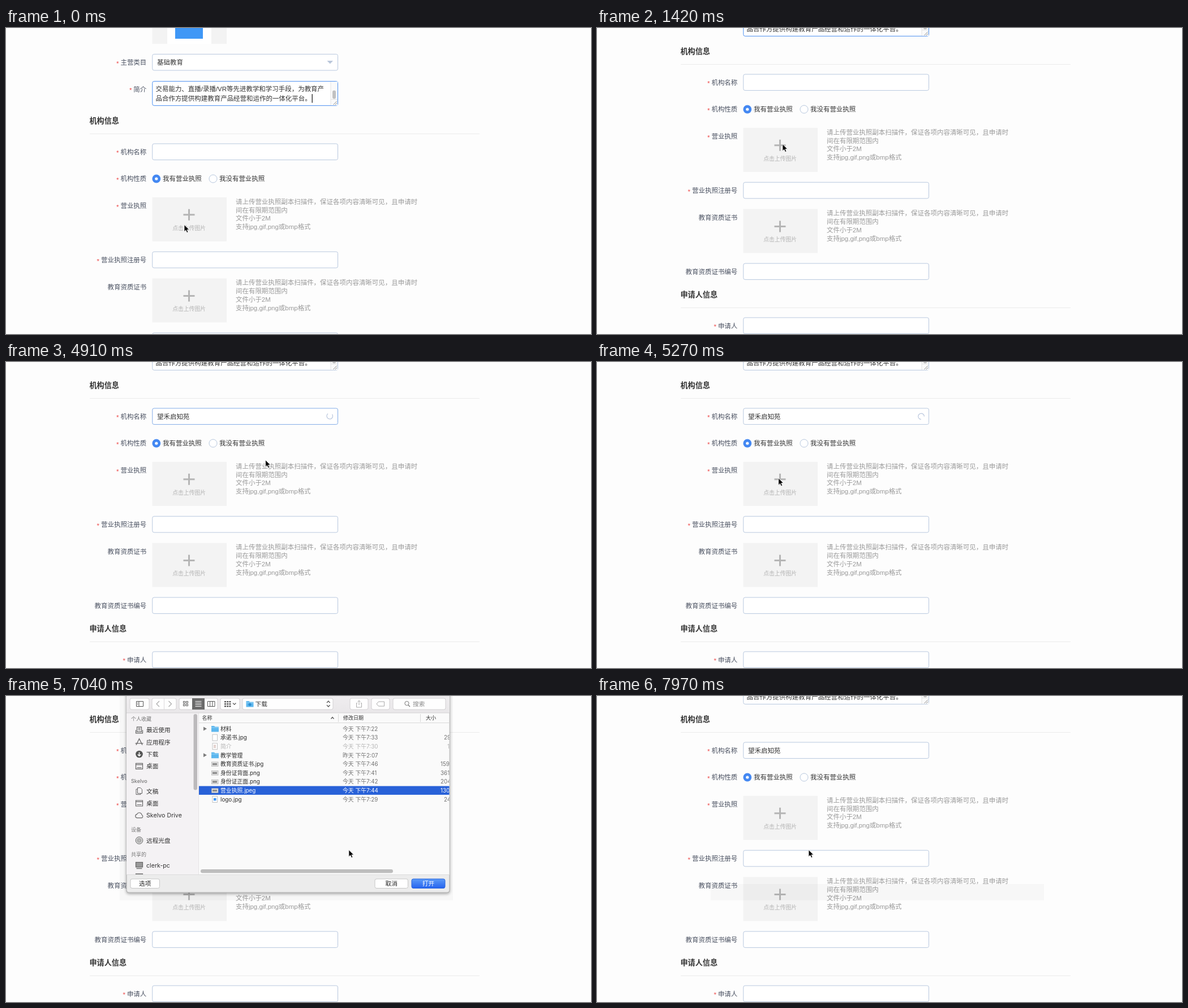
An HTML page for the animation above (8000 ms loop, 1034 by 542 pixels).

```html
<!DOCTYPE html>
<html lang="zh-CN">
<head>
<meta charset="utf-8">
<style>
html, body { margin: 0; width: 100%; height: 100%; overflow: hidden; background: #fdfdfd; }
svg { display: block; width: 1034px; height: 542px; font-family: "Liberation Sans", "Noto Sans CJK SC", "Noto Sans CJK", sans-serif; }
#sheet, #ime { font-family: Inter, "Noto Sans CJK SC", "Noto Sans CJK", sans-serif; }
text { white-space: pre; }
</style>
</head>
<body>
<svg id="stage" viewBox="0 0 1034 542">
  <defs>
    <clipPath id="areaClip"><rect x="259" y="95" width="315" height="42"/></clipPath>
    <clipPath id="listClip"><rect x="341" y="30" width="442.5" height="286"/></clipPath>
    <clipPath id="sideClip"><rect x="213" y="30" width="128" height="286"/></clipPath>
    <linearGradient id="bar" x2="0" y2="1"><stop stop-color="#f3f1f3"/><stop offset="1" stop-color="#e9e7e9"/></linearGradient>
    <linearGradient id="blue" x2="0" y2="1"><stop stop-color="#5b9af8"/><stop offset="1" stop-color="#2563ee"/></linearGradient>
    <filter id="soft" x="-10%" y="-20%" width="120%" height="150%"><feDropShadow dx="0" dy="2" stdDeviation="2.5" flood-opacity=".35"/></filter>
  </defs>
  <g id="page"></g>
  <rect id="shade" x="201" width="589" fill="#000" opacity=".022"/>
  <g id="sheet"></g>
  <g id="ime"></g>
  <path id="arrow" d="M0 0V12.2L2.8 9.6L4.8 14L6.9 13.1L5 8.8H8.8Z" fill="#000" stroke="#fff" stroke-width=".8"/>
  <path id="beam" d="M-3 -7Q0 -7 0 -5Q0 -7 3 -7M0 -5V5M-3 7Q0 7 0 5Q0 7 3 7M-1.5 2H1.5" fill="none" stroke="#222" stroke-width="1.2"/>
</svg>
<script>
const $ = id => document.getElementById(id);
const BASE = 11.48, LINE = '#b8c8de', FOCUS = '#4b8ff0', NAME = '望禾启知苑';

// Text is placed by the vertical middle of its characters.
const text = (x, y, s, size = BASE, fill = '#333', more = '') =>
  `<text x="${x}" y="${y + size * .38}" font-size="${size}" fill="${fill}" ${more}>${s}</text>`;
const rect = (x, y, w, h, fill, more = '') =>
  `<rect x="${x}" y="${y}" width="${w}" height="${h}" fill="${fill}" ${more}/>`;
const path = (d, stroke, w = 1, more = '') =>
  `<path d="${d}" fill="none" stroke="${stroke}" stroke-width="${w}" ${more}/>`;
const solid = (d, fill) => `<path d="${d}" fill="${fill}"/>`;
const circle = (x, y, r, fill, more = '') => `<circle cx="${x}" cy="${y}" r="${r}" fill="${fill}" ${more}/>`;

const label = (y, s, must = true) =>
  text(248.3, y, s, BASE, '#495060', 'text-anchor="end"') +
  (must ? text(195 - (s.length - 4) * BASE, y + 1.5, '*', BASE, '#ed3f3f') : '');
const field = (y, h = 28.6, id = '') =>
  rect(258.8, y, 327.7, h, '#fff', `rx="3" stroke="${LINE}" id="${id}"`);
const heading = (y, s) =>
  text(147.5, y, s, 13.12, '#333', 'font-weight="600"') +
  path(`M148 ${y + 23.5}H837`, '#ececec');
const hints = ['请上传营业执照副本扫描件，保证各项内容清晰可见，且申请时', '间在有限期范围内', '文件小于2M', '支持jpg,gif,png或bmp格式'];
const upload = y =>
  rect(258.5, y, 131.5, 78, '#f3f3f3') +
  path(`M313.5 ${y + 31}H333.5M323.5 ${y + 21}V${y + 41}`, '#b5b5b5', 3) +
  text(323.7, y + 54, '点击上传图片', 9.84, '#b3b3b3', 'text-anchor="middle"') +
  hints.map((s, i) => text(406, y + 7.6 + i * 14.75, s, BASE, '#999')).join('');

function buildPage() {
  return rect(258.5, -50, 131.5, 78, '#f3f3f3') + rect(285, -50, 78, 78, '#fff') + rect(299, -30, 49, 49, '#3f97f6') +
    label(61, '主营类目') + field(46.4) + text(267, 61, '基础教育') + solid('M567.5 58H578L572.8 63.5Z', '#b9c6da') +
    label(108.5, '简介') + field(94.4, 43, 'area') +
    `<g clip-path="url(#areaClip)">${text(264.5, 107.2, '交易能力、直播/录播/VR等先进教学和学习手段，为教育产')}${text(264.5, 124.8, '品合作方提供构建教育产品经营和运作的一体化平台。')}</g>` +
    rect(574, 95, 12, 42, '#fafafa') + path('M574 95V137M574 126.5H586', '#e3e3e3') +
    rect(577, 110.5, 6, 15, '#c1c1c1', 'rx="3"') + path('M578.5 136L585 129.5M582 136L585 133', '#8a8a8a') +
    rect(540.6, 117, 1.2, 15.5, '#111', 'id="areaCaret"') +
    heading(164, '机构信息') +
    label(219.2, '机构名称') + field(205, 28.6, 'org') + text(267, 219.2, '', BASE, '#333', 'id="typed"') +
    path('M267 226.5H276', '#333', 1, 'id="under"') + rect(267, 211, 1, 16, '#111', 'id="caret"') +
    path('M569 214.5A5.3 5.3 0 1 0 576.5 215.5', '#b9c6dd', 1.2, 'id="spin"') +
    label(267, '机构性质') + circle(265.8, 267, 7.4, '#4488f2') + circle(265.8, 267, 2.6, '#fff') +
    text(277, 267, '我有营业执照') + circle(366, 267, 7, '#fff', `stroke="${LINE}"`) + text(377, 267, '我没有营业执照') +
    label(315, '营业执照') + upload(299.8) +
    label(411, '营业执照注册号') + field(396.3) +
    label(458.5, '教育资质证书', false) + upload(443.5) +
    label(554.5, '教育资质证书编号', false) + field(540) +
    heading(595, '申请人信息') + label(650.3, '申请人') + field(636);
}

const box = (x, w, y = 4, h = 20, fill = '#fefefe') => rect(x, y, w, h, fill, 'rx="3" stroke="#d2d0d2"');
const folder = (x, y) => solid(`M${x} ${y - 5}h5l1.5 1.5h6.5v9h-13z`, '#5db7ee') + path(`M${x} ${y - 2}h13`, '#9ad5f6');

function toolbar() {
  const g = '#555', pale = '#a9a9a9';
  let dots = '';
  for (let i = 0; i < 4; i++) dots += rect(313.5 + (i % 2) * 5, 9.5 + (i >> 1) * 5, 3, 3, 'none', `stroke="${g}" stroke-width=".9"`);
  for (let i = 0; i < 9; i++) dots += rect(386 + (i % 3) * 4.2, 9 + Math.floor(i / 3) * 4, 3, 2.4, g);
  return rect(213, -20, 571, 50, 'url(#bar)') + path('M213 30H784', '#cfcdcf') +
    box(219, 34) + path('M230.5 9.5H242.5V18.5H230.5ZM235 9.5V18.5M232 12H233.5M232 14.5H233.5', g) +
    box(258, 43) + path('M279.5 4V24', '#dcdadc') + path('M271 9L266 14L271 19M287.5 9L292.5 14L287.5 19', '#aaa', 1.2) +
    box(306, 68) + rect(329, 4, 22, 20, '#6a6a6a') + path('M334.5 9.5H345.5M334.5 12.5H345.5M334.5 15.5H345.5M334.5 18.5H345.5', '#fff') +
    path('M356.5 9.5H369V18.5H356.5ZM360.6 9.5V18.5M364.8 9.5V18.5', g) +
    box(379, 34) + dots + path('M401 12.5L403.7 15.2L406.4 12.5', g, 1.2) +
    box(418, 160) + folder(424.5, 14) + circle(431, 15, 2.6, '#2b8dd0') + text(440.5, 14.2, '下载', 10.66) +
    path('M567 12L569.8 9L572.6 12M567 16L569.8 19L572.6 16', g, 1.2) +
    box(608, 32) + path('M621 12.5H619.5V20H628.5V12.5H627M624 16V8M621.5 10.3L624 8L626.5 10.3', pale) +
    box(646, 32) + path('M655 14L658.5 10H668.5V18H658.5Z', pale) +
    box(684, 93) + circle(708.5, 13, 3.6, 'none', 'stroke="#777"') + path('M711 16L714 19', '#777', 1.2) + text(719, 14.2, '搜索', 10.66, '#8b8b8b');
}

function sidebar() {
  const g = '#666';
  const head = (y, s) => text(221, y, s, 9, '#777', 'font-weight="500"');
  const item = (y, s, icon) => text(248, y, s, 10.66, '#333') + `<g transform="translate(235.5 ${y})">${icon}</g>`;
  const desk = path('M-6 -5H6V5H-6ZM-6 -2.8H6M-4 2.5H4', g, 1.2);
  const screen = rect(-6, -5.5, 12, 8.5, '#999', `stroke="${g}" stroke-width="1.2"`) + path('M-5 5.5H5', g, 1.4);
  return rect(213, 30.5, 128, 286, '#f4f2f4') + `<g clip-path="url(#sideClip)">` +
    head(41, '个人收藏') +
    item(60.3, '最近使用', path('M-4 -5.5H4V3H-4ZM-6 0V5.5H6V0M-2 -3H2M-2 -.5H2', g, 1.2)) +
    item(81.8, '应用程序', path('M-5.5 5L0 -6L5.5 5M-7 2H7', g, 1.3)) +
    item(103, '下载', circle(0, 0, 6.3, '#555') + path('M0 -3.5V3M-2.8 .5L0 3.3L2.8 .5', '#fff', 1.5)) +
    item(124.4, '桌面', desk) +
    head(150.3, 'Skelvo') +
    item(168.5, '文稿', path('M-3 -6H2L5 -3V4H-3ZM-3 -3.5H-5.5V6H2.5V4', g)) +
    item(190, '桌面', desk) +
    item(211.4, 'Skelvo Drive', path('M-4 4.5H4.5A3 3 0 0 0 4.5 -1A4.5 4.5 0 0 0 -4 -2A3.3 3.3 0 0 0 -4 4.5Z', g, 1.1)) +
    head(237, '设备') +
    item(255.8, '远程光盘', circle(0, 0, 6.3, '#ddd', `stroke="${g}"`) + circle(0, 0, 3.6, 'none', `stroke="${g}" stroke-width=".7"`) + circle(0, 0, 1.6, '#fff', `stroke="${g}"`)) +
    head(281, '共享的') + item(300, 'clerk-pc', screen) + item(320.5, '', screen) +
    '</g>' + rect(331.5, 32, 6.5, 134.5, '#bcbabc', 'rx="3.2"') + path('M341 30V316', '#d8d6d8');
}

const files = [
  ['材料', '今天 下午7:22', '', 'dir'], ['承诺书.jpg', '今天 下午7:33', '29', 'doc'],
  ['简介', '今天 下午7:30', '1', 'off'], ['教学管理', '昨天 下午2:07', '', 'dir'],
  ['教育资质证书.jpg', '今天 下午7:46', '159', 'pic'], ['身份证背面.png', '今天 下午7:41', '361', 'pic'],
  ['身份证正面.png', '今天 下午7:42', '204', 'pic'], ['营业执照.jpeg', '今天 下午7:44', '130', 'pic'],
  ['logo.jpg', '今天 下午7:29', '24', 'logo']];

function fileIcon(kind, y) {
  if (kind == 'dir') return solid(`M349 ${y - 3.5}L355 ${y}L349 ${y + 3.5}Z`, '#7d7d7d') + folder(363, y);
  if (kind == 'pic') return rect(363.5, y - 3.5, 11.5, 7.5, '#e4e4e4', 'stroke="#aaa" stroke-width=".7"') + rect(365, y - 1.5, 8, 3.5, '#8d8d8d');
  const page = rect(365, y - 5.5, 8.5, 11, '#fff', 'stroke="#b5b5b5" stroke-width=".8"');
  if (kind == 'logo') return page + rect(367, y - 2.2, 4.5, 4.5, '#3f97f6');
  return page + (kind == 'off' ? path(`M367 ${y - 2}h4M367 ${y}h4M367 ${y + 2}h4`, '#c9a9a0') : '');
}

function fileList() {
  const rows = files.map(([name, date, size, kind], i) => {
    const y = 58 + i * 15.62, off = kind == 'off', pick = i == 7;
    const soft = off ? '#b5b5b5' : '#727272';
    return (pick ? rect(341, y - 7.8, 443, 15.4, '#2861d8', 'id="pick"') : '') + fileIcon(kind, y) +
      `<g ${pick ? 'id="pickText"' : ''}>` + text(379, y, name, 9.84, off ? '#b5b5b5' : '#2b2b2b') +
      text(595, y, date, 9.84, soft) + text(768 + (3 - size.length) * 6, y, size, 9.84, soft) + '</g>';
  });
  return `<g clip-path="url(#listClip)">` + rect(341, 30.5, 443, 286, '#fafafa') +
    text(346.5, 39, '名称', 9) + text(596, 39, '修改日期', 9) + text(742, 39, '大小', 9) +
    path('M574.5 40.5L577 37.5L579.5 40.5', '#555', 1.2) + path('M587.5 32V46M732.5 32V46M341 47.5H784', '#d9d9d9') +
    rows.join('') + rect(344, 307, 340, 6.6, '#bdbdbd', 'rx="3.3"') + '</g>';
}

function buildSheet() {
  const button = (x, w, s, id = '') =>
    rect(x, 324, w, 16.5, '#fff', `rx="3" stroke="#c6c6c6" id="${id}"`) +
    text(x + w / 2, 332.3, s, 10.66, '#222', `text-anchor="middle" id="${id}Text"`);
  return `<path d="M213 -20H784V344Q784 348 780 348H217Q213 348 213 344Z" fill="#ececec" stroke="#a9a9a9" filter="url(#soft)"/>` +
    toolbar() + sidebar() + fileList() + path('M213 316.5H784', '#dcdcdc') +
    button(220, 51.5, '选项', 'opt') + button(652, 58.5, '取消', 'no') + button(717, 59, '打开', 'ok');
}

function buildIme() {
  return rect(253, 109, 324, 23.5, '#f5f5f5', 'rx="4" stroke="#c9c9c9" filter="url(#soft)"') +
    rect(256, 111.5, 27, 17.5, '#cfe5fa', 'rx="3" stroke="#a9cdf0" stroke-width=".8"') +
    [...'为问位微未文味维胃'].map((c, i) => text(258 + i * 32, 120.3, i + 1, 9, '#777') + text(266 + i * 32, 120.3, c, 13.1, '#111')).join('') +
    path('M560.5 118L564.8 122L569 118', '#999', 1.1);
}

$('page').innerHTML = buildPage();
$('sheet').innerHTML = buildSheet();
$('ime').innerHTML = buildIme();

const clamp = v => Math.max(0, Math.min(1, v));
const part = (t, a, b) => clamp((t - a) / (b - a));
const within = (t, a, b) => t >= a && t < b;
const show = (id, on) => $(id).style.display = on ? '' : 'none';
const mix = (a, b, k) => {
  const c = i => Math.round(parseInt(a.substr(i, 2), 16) * (1 - k) + parseInt(b.substr(i, 2), 16) * k);
  return `rgb(${c(1)},${c(3)},${c(5)})`;
};
const smooth = k => k * k * (3 - 2 * k);

// Pointer stops: time, x, y
const stops = [[0, 315, 348.5], [1060, 315, 348.5], [1300, 326, 235], [1420, 328, 206], [1590, 315, 138],
  [1830, 306, 100], [2000, 305.5, 95], [3840, 305.5, 95], [4250, 430, 190], [4610, 459, 173.5],
  [4910, 459, 173.5], [5220, 325, 208], [5400, 310, 200], [5660, 275, 145], [5720, 275, 140], [6160, 415.5, 165],
  [6640, 415.5, 165], [7000, 590, 265], [7330, 718, 325.5], [7500, 718, 325.5], [7970, 374, 272.5], [8000, 374, 272.5]];
function pointer(t) {
  const i = stops.findIndex(s => s[0] > t), [a, b] = [stops[i - 1], stops[i]];
  const k = part(t, a[0], b[0]);
  return [a[1] + (b[1] - a[1]) * k, a[2] + (b[2] - a[2]) * k];
}

function sheetY(t) {
  if (t < 5300 || t >= 7700) return -370;
  return -358 * Math.pow(1 - part(t, 5300, 5600), 2.5) - 350 * Math.pow(part(t, 7370, 7700), 2.3);
}

function draw(t) {
  const scroll = 60 * smooth(part(t, 60, 490)) + 63 * smooth(part(t, 720, 1200));
  $('page').setAttribute('transform', `translate(0 ${-scroll})`);
  $('area').setAttribute('stroke', mix(FOCUS, LINE, part(t, 1830, 2000)));
  show('areaCaret', t < 800);

  const blur = t < 4910 ? 0 : part(t, 4810, 5010);
  $('org').setAttribute('stroke', mix(LINE, FOCUS, part(t, 1800, 1980) * (1 - blur)));
  const typing = within(t, 3070, 3360), done = t >= 3360;
  $('typed').textContent = typing ? 'w' : done ? NAME : '';
  $('caret').setAttribute('x', typing ? 276.5 : done ? 325 : 267);
  show('caret', within(t, 1830, 2360) || within(t, 2830, 3840) || within(t, 4370, 4910));
  show('under', typing);
  show('ime', typing);
  show('spin', within(t, 4910, 5300));
  $('spin').setAttribute('transform', `rotate(${(t - 4910) * .36} 572.5 219.2)`);

  const y = sheetY(t), picked = t >= 6580;
  show('sheet', y > -365);
  $('sheet').setAttribute('transform', `translate(0 ${y})`);
  show('pick', picked);
  for (const n of $('pickText').children) n.style.fill = picked ? '#fff' : '';
  $('ok').setAttribute('fill', picked ? 'url(#blue)' : '#f6f6f6');
  $('ok').setAttribute('stroke', picked ? '#2a66dc' : '#d6d6d6');
  $('okText').setAttribute('fill', picked ? '#fff' : '#b4b4b4');

  const top = t >= 7700 ? 333 : 0;
  show('shade', t >= 5300);
  $('shade').setAttribute('y', top);
  $('shade').setAttribute('height', Math.max(0, (t < 5600 ? y : 0) + 362 - top));

  const beam = within(t, 1790, 3890), [px, py] = pointer(t);
  show('beam', beam);
  show('arrow', !beam);
  $(beam ? 'beam' : 'arrow').setAttribute('transform', `translate(${px} ${py})`);
}

const start = performance.now();
function tick() {
  draw((performance.now() - start) % 8000);
  requestAnimationFrame(tick);
}
tick();
</script>
</body>
</html>
```
